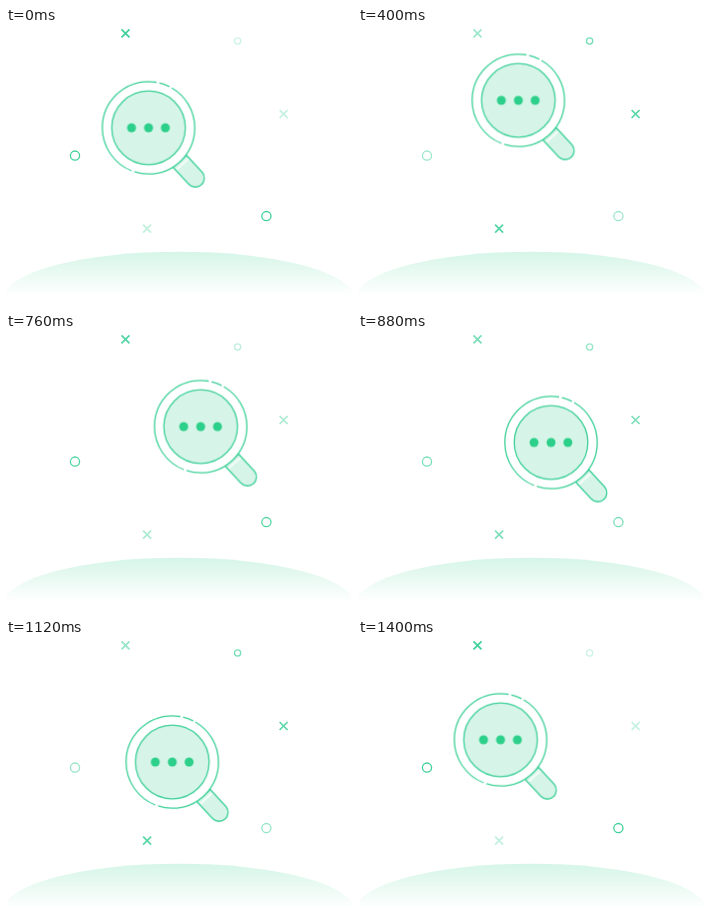
Recreate the animation shown at these times as an HTML page. Size 346 px wide and 278 px high, loop 1.44 s.

```html
<!DOCTYPE html>
<html lang="en">
<head>
<meta charset="utf-8">
<title>Searching</title>
<style>
  html, body { margin: 0; width: 100%; height: 100%; overflow: hidden; background: #fff; }
  svg { display: block; width: 346px; height: 278px; }
  .line { fill: none; stroke: #3fd199; stroke-width: 1.3; }
  .pale { fill: #d6f5e8; }
  .cross { stroke-width: 1.7; }
  .fade, .grow { animation: 1440ms linear infinite; }
  .fade { animation-name: fade; }
  .grow { animation-name: grow; }
  .glass { animation: orbit 1440ms infinite; }

  @keyframes fade {
    0%, 48.6%, 97.2%, 100% { opacity: 1; }
    24.3%, 72.9% { opacity: .43; }
  }
  @keyframes grow {
    0%, 48.6%, 97.2%, 100% { opacity: .32; }
    24.3%, 72.9% { opacity: 1; }
  }
  /* Circles the centre in 40 ms ticks, slower over the first quarter */
  @keyframes orbit {
    0% { transform: rotate(174.9deg) translateX(26.6px) rotate(-174.9deg); animation-timing-function: steps(5); }
    13.8889% { transform: rotate(210.9deg) translateX(26.5px) rotate(-210.9deg); animation-timing-function: steps(5); }
    27.7778% { transform: rotate(250.9deg) translateX(26.5px) rotate(-250.9deg); animation-timing-function: steps(2); }
    33.3333% { transform: rotate(269deg) translateX(26.4px) rotate(-269deg); animation-timing-function: steps(7); }
    52.7778% { transform: rotate(349.4deg) translateX(26.1px) rotate(-349.4deg); animation-timing-function: steps(5); }
    66.6667% { transform: rotate(408.2deg) translateX(26.7px) rotate(-408.2deg); animation-timing-function: steps(4); }
    77.7778% { transform: rotate(456.3deg) translateX(24.8px) rotate(-456.3deg); animation-timing-function: steps(7); }
    97.2222%, 100% { transform: rotate(534.9deg) translateX(26.6px) rotate(-534.9deg); }
  }
</style>
</head>
<body>
<svg viewBox="0 0 346 278">
  <defs>
    <linearGradient id="mist" x1="0" y1="224" x2="0" y2="268" gradientUnits="userSpaceOnUse">
      <stop offset="0" stop-color="#d6f5e8"/>
      <stop offset="1" stop-color="#fff"/>
    </linearGradient>
    <path id="x" d="M-4-4 4 4M4-4-4 4"/>
  </defs>

  <path fill="url(#mist)" d="M-2 270A175 46.3 0 0 1 348 270Z"/>

  <g class="line fade">
    <use href="#x" class="cross" x="119.5" y="5.3"/>
    <circle cx="69" cy="127.6" r="4.6"/>
    <circle cx="260.4" cy="188.1" r="4.6"/>
  </g>
  <g class="line grow">
    <use href="#x" class="cross" x="277.6" y="86"/>
    <use href="#x" class="cross" x="141.1" y="200.6"/>
    <circle cx="231.6" cy="13" r="3.1" opacity=".8"/>
  </g>

  <g transform="translate(169 97.4)">
    <g class="glass">
      <path class="line pale" style="fill:#d6f5e8" d="M24.5 39.5 40.3 56.5A9 9 0 0 0 53.7 44.5L38 27.5Z"/>
      <path d="M28.3 41.6 39.5 31.2" stroke="#fff" stroke-width="2" opacity=".8"/>
      <circle class="line" r="46.2" style="fill:#fff" pathLength="360"
        stroke-dasharray="108 3.5 168.5 3.5 13.5 3 60 0"/>
      <circle class="line" r="36.8" style="fill:#d6f5e8"/>
      <g fill="#2dd08a">
        <circle cx="-17" r="4.5"/>
        <circle r="4.5"/>
        <circle cx="16.8" r="4.5"/>
      </g>
    </g>
  </g>
</svg>
</body>
</html>
```
